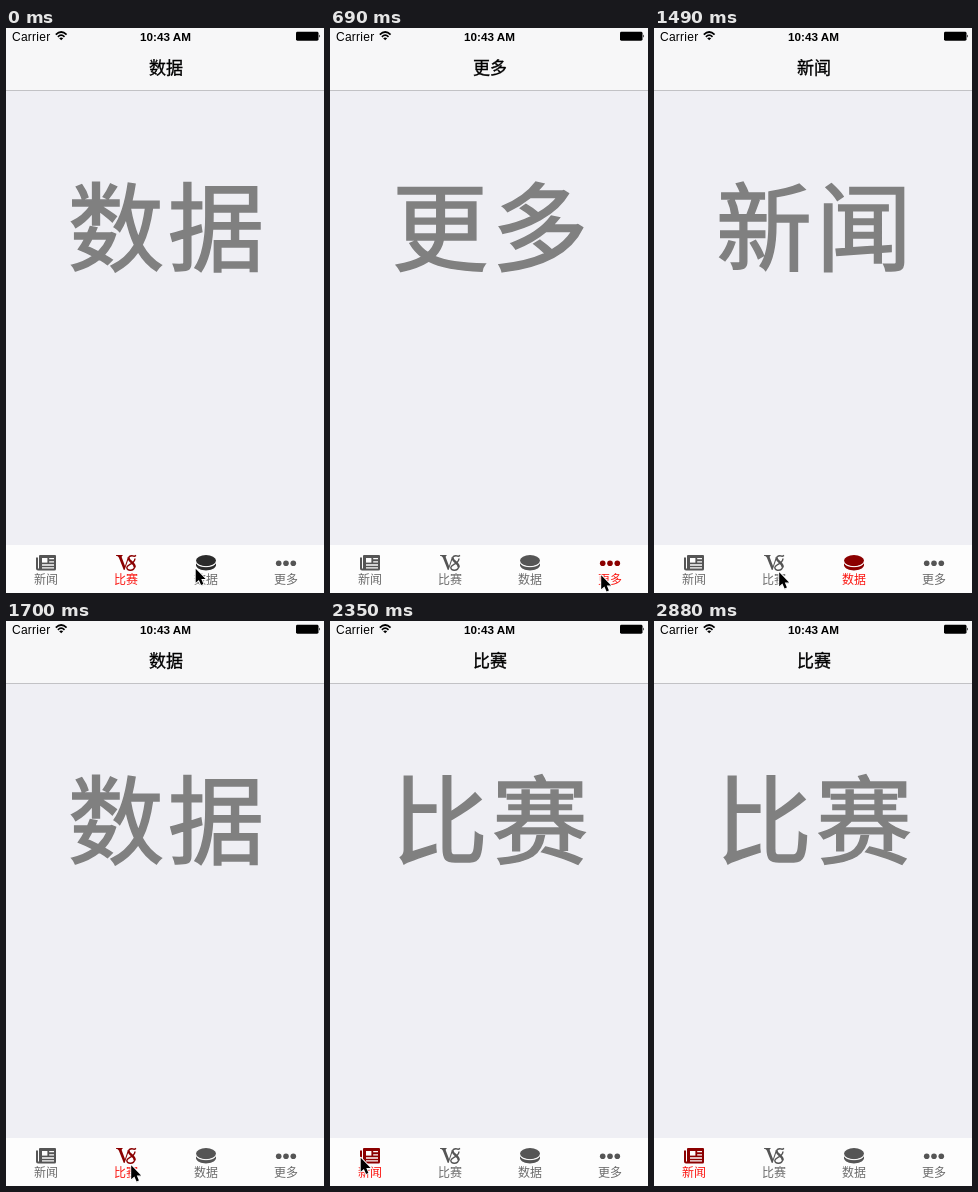
An HTML page for the animation above (3290 ms loop, 318 by 565 pixels).

```html
<!DOCTYPE html>
<html lang="zh-CN">
<head>
<meta charset="utf-8">
<title>Tab bar</title>
<style>
  html, body { margin: 0; width: 100%; height: 100%; overflow: hidden; background: #efeff4; }
  svg { display: block; width: 318px; height: 565px; }
  text { font-family: "Noto Sans CJK SC", "Noto Sans CJK", sans-serif; text-anchor: middle; }
  .status text { font-family: "Liberation Sans", sans-serif; }
  .tab { --icon: #555; --label: #6b6b6b; }
  .tab.pressed { --icon: #2b2b2b; }
  .tab.selected { --icon: #8b0000; --label: #fb1510; }
  .tab text { font-size: 12px; fill: var(--label); }
  .fill { fill: var(--icon); }
  .line { fill: none; stroke: var(--icon); }
  .cut { fill: none; stroke: #fdfdfd; }
</style>
</head>
<body>
<svg viewBox="0 0 318 565">
  <rect width="318" height="565" fill="#efeff4"/>
  <rect width="318" height="62" fill="#f7f7f8"/>
  <rect y="62" width="318" height="1" fill="#c2c2c5"/>
  <rect y="517" width="318" height="48" fill="#fdfdfd"/>

  <g class="status">
    <text x="6" y="12.5" font-size="12" letter-spacing=".25" style="text-anchor:start">Carrier</text>
    <text x="159.5" y="12.5" font-size="11.7" font-weight="700">10:43 AM</text>
    <g fill="none" stroke="#000" stroke-width="1.7">
      <path d="M49.8 6.6Q55.2 1.4 60.6 6.6M51.9 8.8Q55.2 5.6 58.5 8.8"/>
      <path d="M55.2 12.3L53.2 10.2Q55.2 8.6 57.2 10.2Z" fill="#000" stroke="none"/>
    </g>
    <rect x="290" y="3.8" width="22.5" height="8.9" rx="1.4"/>
    <path d="M313.2 6.6Q315 8.2 313.2 9.8Z"/>
  </g>

  <text id="title" x="160" y="46.3" font-size="17" font-weight="500" stroke="#000" stroke-width=".35"/>
  <text id="page" x="162" y="234.5" font-size="96" letter-spacing="4" font-weight="500"
        fill="#808080" stroke="#808080" stroke-width="1.6"/>

  <g class="tab" transform="translate(40 535)">
    <path class="fill" d="M-10 -5.6H-8V5.4H-7V-7Q-7 -8 -6 -8H9Q10 -8 10 -7V6Q10 7.5 8.5 7.5H-8Q-10 7.5 -10 5.5Z"/>
    <rect x="-4" y="-5" width="5.4" height="4.6" fill="#fdfdfd"/>
    <path class="cut" stroke-width="1.3" d="M3.2 -4.4H8M3.2 -1.2H8M-4 2H8M-4 4.8H8"/>
    <text y="21">新闻</text>
  </g>
  <g class="tab" transform="translate(120 535)">
    <path class="fill" d="M-10 -8H-3.4V-7.2Q-4.6 -7 -4.2 -5.6L-1 3L1.4 -4.2L2.4 -3.8L-1.4 7H-2.2L-7.2 -5.6Q-8 -7.2 -10 -7.2Z"/>
    <path class="line" stroke-width="2.4" d="M2.6 -5.4C1.6 -2 9.6 .2 8.6 4.2"/>
    <path class="line" stroke-width="1.4" d="M10 -7.6C7.6 -5.8 8.4 -7.4 5.8 -7.3Q3 -7.2 2.6 -5M8.6 4C7.8 8.2 .8 8.4 .8 4.6C.8 1.4 8.8 1.2 9 -4.6"/>
    <text y="21">比赛</text>
  </g>
  <g class="tab" transform="translate(200 535)">
    <ellipse class="fill" cy="-2.4" rx="10" ry="5.6"/>
    <path class="fill" d="M-10 -.6C-8.5 5.4 8.5 5.4 10 -.6V2.6C8.6 9 -8.6 9 -10 2.6Z"/>
    <path class="cut" stroke-width=".7" d="M-10 -.6C-8.5 5.2 8.5 5.2 10 -.6"/>
    <text y="21">数据</text>
  </g>
  <g class="tab" transform="translate(280 535)">
    <g class="fill">
      <circle cx="-7.3" cy=".3" r="2.8"/><circle cy=".3" r="2.8"/><circle cx="7.3" cy=".3" r="2.8"/>
    </g>
    <text y="21">更多</text>
  </g>

  <g id="cursor" stroke-linejoin="round">
    <path d="M1.2 2.6V16.6L4.4 13.8L6.6 18.8L9.1 17.8L7 12.9H11.3Z" opacity=".18"/>
    <path d="M1.2 1.2V15.2L4.4 12.4L6.6 17.4L8.9 16.4L6.8 11.5H11.1Z"
          stroke="#fff" stroke-width="1.8" paint-order="stroke"/>
  </g>
</svg>
<script>
const LOOP = 3290, EXIT = 2880;
const [NEWS, MATCH, DATA, MORE] = [0, 1, 2, 3];
const names = ['新闻', '比赛', '数据', '更多'];

// Page shown, tab highlighted, tab held down
const states = [
  { at: 0, page: DATA, tab: MATCH, held: DATA },
  { at: 20, page: NEWS, tab: DATA },
  { at: 660, page: NEWS, tab: DATA, held: MORE },
  { at: 690, page: MORE, tab: MORE },
  { at: 1210, page: MORE, tab: MORE, held: DATA },
  { at: 1240, page: NEWS, tab: DATA },
  { at: 1700, page: DATA, tab: MATCH },
  { at: 2320, page: DATA, tab: MATCH, held: NEWS },
  { at: 2350, page: MATCH, tab: NEWS }
];

// The pointer travels in discrete steps between these rests
const home = [188.5, 539.5];
const moves = [
  { from: 230, to: 370, steps: 6, end: [270, 546] },
  { from: 870, to: 1000, steps: 5, end: [199, 546] },
  { from: 1150, to: 1150, steps: 1, end: [198, 546.5] },
  { from: 1340, to: 1490, steps: 6, end: [124, 543] },
  { from: 1880, to: 2150, steps: 10, end: [29.5, 535.5] },
  { from: 2490, to: EXIT, steps: 14, end: [260, 566] }
];

const $ = id => document.getElementById(id);
const tabs = [...document.querySelectorAll('.tab')];
const smooth = p => p * p * (3 - 2 * p);

function pointer(t) {
  let pos = home;
  for (const { from, to, steps, end } of moves) {
    if (t < from) break;
    const gap = (to - from) / Math.max(1, steps - 1);
    const step = t >= to ? steps : Math.floor((t - from) / gap) + 1;
    const p = smooth(step / steps);
    pos = pos.map((v, i) => v + (end[i] - v) * p);
  }
  return pos;
}

function draw(t) {
  const { page, tab, held } = states.findLast(s => s.at <= t);
  $('title').textContent = $('page').textContent = names[page];
  tabs.forEach((el, i) => {
    el.classList.toggle('selected', i === tab);
    el.classList.toggle('pressed', i === held);
  });
  $('cursor').setAttribute('transform', `translate(${pointer(t)})`);
  $('cursor').setAttribute('visibility', t < EXIT ? 'visible' : 'hidden');
}

const start = performance.now();
function tick() {
  draw((performance.now() - start) % LOOP);
  requestAnimationFrame(tick);
}
tick();
</script>
</body>
</html>
```
